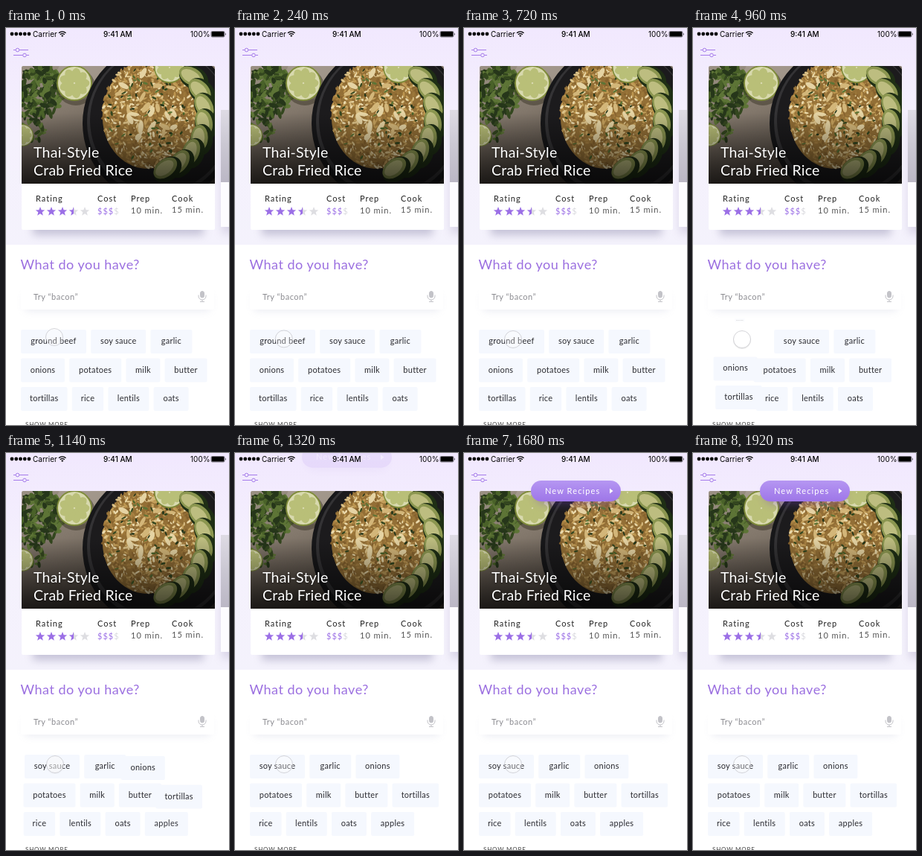
An HTML page for the animation above (2.42 s loop, 300x533 px).

```html
<!DOCTYPE html>
<html lang="en">
<head>
<meta charset="utf-8">
<title>Recipe ingredients</title>
<style>
html, body { margin: 0; width: 100%; height: 100%; overflow: hidden; background: #fff; }
svg { display: block; width: 100vw; height: 100vh; }
text { font-family: Lato, "Open Sans", sans-serif; font-size: 11px; fill: #222; }
.status text { font-family: Inter, "Liberation Sans", sans-serif; font-size: 10px; fill: #000; }
.title text { font-size: 19.5px; letter-spacing: .25px; fill: #fff; text-shadow: 0 1px 3px #0009; }
.info text { letter-spacing: 1px; }
.info .value { fill: #555; }
.chip text { letter-spacing: .25px; text-anchor: middle; fill: #2b2b30; }
</style>
</head>
<body>
<svg viewBox="0 0 300 533" preserveAspectRatio="none">
  <defs>
    <linearGradient id="sky" x2="0" y2="1"><stop stop-color="#f1e8fe"/><stop offset=".5" stop-color="#f5f1fd"/><stop offset="1" stop-color="#f4f2fc"/></linearGradient>
    <linearGradient id="table" x2=".5" y2="1"><stop stop-color="#9b9184"/><stop offset=".4" stop-color="#82776b"/><stop offset="1" stop-color="#3a332e"/></linearGradient>
    <linearGradient id="shade" x2="0" y2="1"><stop offset=".4" stop-color="#000" stop-opacity="0"/><stop offset="1" stop-color="#000" stop-opacity=".66"/></linearGradient>
    <linearGradient id="next" x2="0" y2="1"><stop stop-color="#dedbe4"/><stop offset=".5" stop-color="#cac7d2"/><stop offset="1" stop-color="#bbb7c5"/></linearGradient>
    <linearGradient id="violet" x2="0" y2="1"><stop stop-color="#b596f2"/><stop offset="1" stop-color="#9e76e8"/></linearGradient>
    <linearGradient id="half"><stop offset=".5" stop-color="#9b6fe6"/><stop offset=".5" stop-color="#dedee2"/></linearGradient>
    <filter id="blur" x="-50%" y="-100%" width="200%" height="300%"><feGaussianBlur stdDeviation="6"/></filter>
    <clipPath id="frame"><path d="M21 209V53a2 2 0 0 1 2-2H279a2 2 0 0 1 2 2V209Z"/></clipPath>
  </defs>

  <rect width="300" height="533" fill="#fff"/>
  <rect width="300" height="291" fill="url(#sky)"/>
  <g fill="none" stroke="#a57bea" stroke-width="1">
    <path d="M10 29.500h3M18 29.500h12M10 36.500h12.500M27.500 36.500h3.500"/>
    <circle cx="15.500" cy="29.500" r="2.300"/><circle cx="25" cy="36.500" r="2.300"/>
  </g>

  <rect x="290" y="122" width="20" height="154" fill="#8b80aa" opacity=".25" filter="url(#blur)"/>
  <rect x="289" y="110" width="11" height="157" fill="#fdfcff"/>
  <rect x="289" y="110" width="11" height="97" fill="url(#next)"/>
  <rect x="36" y="200" width="230" height="78" fill="#77739a" opacity=".38" filter="url(#blur)"/>
  <rect x="21" y="51" width="260" height="220" rx="2" fill="#fff"/>
  <g clip-path="url(#frame)">
    <rect x="21" y="51" width="260" height="158" fill="url(#table)"/>
    <g id="food"></g>
    <rect x="21" y="51" width="260" height="158" fill="url(#shade)"/>
  </g>
  <g class="title"><text x="37" y="174">Thai-Style</text><text x="37" y="198">Crab Fried Rice</text></g>

  <g class="info">
    <text x="40" y="233">Rating</text><text x="123" y="233">Cost</text>
    <text x="168" y="233">Prep</text><text x="223" y="233">Cook</text>
    <g id="stars"></g>
    <text x="123" y="249.500" style="fill:#9b6fe6">$$$<tspan fill="#d9d9de">$</tspan></text>
    <text class="value" x="168" y="249">10 min.</text><text class="value" x="223" y="248">15 min.</text>
  </g>

  <text x="19.500" y="323.500" style="font-size:18px;letter-spacing:.5px;fill:#9b6fe0">What do you have?</text>
  <rect x="26" y="358" width="248" height="21" fill="#8f96bb" opacity=".2" filter="url(#blur)"/>
  <rect x="20" y="342" width="260" height="36" rx="2" fill="#fff"/>
  <text x="37" y="365" style="letter-spacing:.5px;fill:#8b8b90">Try “bacon”</text>
  <g stroke="#c3c3c8" fill="none"><rect x="261.500" y="353.500" width="5" height="8.500" rx="2.500" fill="#c3c3c8"/><path d="M259 358.500v1.500a5 5 0 0 0 10 0v-1.500M264 365v3M261 367.500h6"/></g>

  <g id="chips"></g>
  <text x="26" y="535" style="font-size:8px;letter-spacing:.8px;fill:#444">SHOW MORE</text>
  <g id="touch">
    <circle id="glow" cx="66" cy="419" r="12" fill="#777"/>
    <circle id="dot" cx="66" cy="418" r="11.500" fill="#fff" stroke="#c2c2c8" stroke-width=".7"/>
  </g>

  <g id="pill">
    <rect x="96" y="46" width="109" height="22" rx="11" fill="#7448bd" opacity=".4" filter="url(#blur)"/>
    <rect x="90" y="37" width="121" height="28" rx="14" fill="url(#violet)"/>
    <text x="109" y="54.500" style="letter-spacing:1.1px;fill:#fff">New Recipes</text>
    <path d="M196 47.500l4.500 3.500-4.500 3.500z" fill="#fff"/>
  </g>

  <g class="status">
    <path d="M8 8h23.500" stroke="#000" stroke-width="4.800" stroke-linecap="round" stroke-dasharray="0 5.750"/>
    <text x="36" y="11.500">Carrier</text>
    <g fill="none" stroke="#000" stroke-width="1.300"><path d="M71 6.800a6.800 6.800 0 0 1 9.500 0M72.800 8.800a4.200 4.200 0 0 1 6 0"/></g>
    <path d="M74.200 10.300a2.300 2.300 0 0 1 3.200 0l-1.600 1.700z"/>
    <text x="131" y="11.500" font-weight="500">9:41 AM</text><text x="248" y="11.500">100%</text>
    <rect x="276" y="4.500" width="18" height="7.500" rx="1.500" fill="none" stroke="#000" stroke-width=".5"/>
    <rect x="276.600" y="5.100" width="16.800" height="6.300" rx="1"/><path d="M295 6.700q1.500 1.500 0 3z"/>
  </g>
</svg>
<script>
const $ = id => document.getElementById(id);
const clamp = v => Math.max(0, Math.min(1, v));
const span = (t, start, length) => clamp((t - start) / length);
const easeInOut = (u, n) => u < .5 ? (2 * u) ** n / 2 : 1 - (2 - 2 * u) ** n / 2;
const mix = (a, b, p) => a + (b - a) * p;

let seed = 7;
const rand = (a = 0, b = 1) => {
  seed = (seed * 16807) % 2147483647;
  return mix(a, b, seed / 2147483647);
};
const pick = list => list[Math.floor(rand(0, list.length))];
const oval = (x, y, rx, ry, fill, turn = 0, extra = '') =>
  `<ellipse rx="${rx}" ry="${ry}" fill="${fill}" transform="translate(${x} ${y}) rotate(${turn})" ${extra}/>`;

// Scatter small ovals over an elliptical patch.
function scatter(count, x, y, rx, ry, size, colors) {
  let out = '';
  for (let i = 0; i < count; i++) {
    const a = rand(0, 2 * Math.PI), r = Math.sqrt(rand());
    out += oval(x + rx * r * Math.cos(a), y + ry * r * Math.sin(a),
      size * rand(.7, 1.3), size * rand(.3, .55), pick(colors), rand(0, 180));
  }
  return out;
}

function lime(x, y, r) {
  let out = oval(x, y, r, r, '#7f8c3a') + oval(x, y, r * .92, r * .92, '#d8d9ae');
  for (let i = 0; i < 9; i++) {
    const a = i * 40, rad = a * Math.PI / 180;
    out += oval(x + r * .45 * Math.cos(rad), y + r * .45 * Math.sin(rad), r * .4, r * .27, '#b9bf78', a);
  }
  return out;
}

function drawFood() {
  const greens = ['#34471f', '#4a6229', '#26361a', '#5d7436'];
  const grains = ['#c4a05c', '#a98243', '#dcc288', '#86622e', '#ead9ab', '#9c773a', '#bd9650'];
  let out = oval(112, 60, 46, 34, '#b5ab9f', -20, 'opacity=".45"');
  out += scatter(170, 48, 84, 30, 34, 6, greens) + scatter(60, 34, 126, 18, 32, 4.5, greens);
  out += oval(94, 79, 26, 25, '#3b3427', 0, 'opacity=".5"') + lime(92, 74, 24) + lime(22, 144, 15);
  out += oval(206, 128, 103, 106, '#171719') + oval(206, 126, 97, 100, '#343335') + oval(207, 124, 94, 96, '#1c1b1d');
  out += oval(193, 115, 63, 74, '#936f36', 8);
  out += scatter(950, 193, 114, 63, 73, 3, grains);
  out += scatter(24, 190, 108, 44, 54, 7, ['#e5d3a3', '#d3b679']);
  out += scatter(70, 190, 115, 55, 66, 2.8, greens);
  out += lime(220, 53, 21);
  for (let i = 0; i < 8; i++) {
    const a = (-42 + i * 17) * Math.PI / 180;
    const x = 200 + 68 * Math.cos(a), y = 116 + 75 * Math.sin(a), turn = 30 + i * 16;
    out += oval(x + 2, y + 1, 21, 15, '#1f2f15', turn) + oval(x - 1, y - 1, 18, 11.5, '#8b9650', turn)
      + oval(x - 2, y - 1, 14, 8, '#bdbd80', turn);
  }
  $('food').innerHTML = out;
}

function drawStars() {
  const fills = ['#9b6fe6', '#9b6fe6', '#9b6fe6', 'url(#half)', '#dedee2'];
  $('stars').innerHTML = fills.map((fill, i) => {
    const points = Array.from({ length: 10 }, (_, k) => {
      const a = (k * 36 - 90) * Math.PI / 180, r = k % 2 ? 2.8 : 6.5;
      return [46 + i * 15 + r * Math.cos(a), 246.5 + r * Math.sin(a)];
    });
    return `<polygon points="${points.join(' ')}" fill="${fill}"/>`;
  }).join('');
}

const items = [['ground beef', 88], ['soy sauce', 74], ['garlic', 56], ['onions', 59], ['potatoes', 70],
  ['milk', 46], ['butter', 57], ['tortillas', 62.5], ['rice', 42.5], ['lentils', 55], ['oats', 47], ['apples', 58]];

// Place chips in rows of three, four and the rest.
function flow(list) {
  let x = 20;
  return list.map(([, width], i) => {
    if (i === 3 || i === 7) x = 20;
    const place = { x, y: 405 + 38.5 * ((i >= 3) + (i >= 7)) };
    x += width + 6.2;
    return place;
  });
}
const before = flow(items), after = flow(items.slice(1));

drawFood();
drawStars();
$('chips').innerHTML = items.map(([name, width]) =>
  `<g class="chip"><rect width="${width}" height="32" rx="2" fill="#f5f8fe"/><text x="${width / 2}" y="19">${name}</text></g>`).join('');
const chips = [...$('chips').children];

function draw(t) {
  const gone = easeInOut(span(t, 740, 230), 2);
  chips[0].setAttribute('transform', `translate(${mix(64, 63, gone)} ${mix(421, 392, gone)}) scale(${mix(1, .15, gone)}) translate(-44 -16)`);
  chips[0].setAttribute('opacity', t > 1000 ? 0 : 1 - gone * .7);

  const shift = easeInOut(span(t, 840, 420), 4);
  after.forEach((to, i) => {
    const from = before[i + 1];
    chips[i + 1].setAttribute('transform', `translate(${mix(from.x, to.x, shift)} ${mix(from.y, to.y, shift)})`);
  });
  chips[11].setAttribute('opacity', shift < .1 ? 0 : shift);

  const settle = span(t, 0, 300), press = span(t, 720, 180) * (1 - span(t, 1020, 180));
  $('touch').setAttribute('transform', `translate(${settle - 1} ${3 * settle - 3})`);
  $('dot').setAttribute('fill-opacity', mix(.3, 1, press));
  $('glow').setAttribute('opacity', press * .15);

  const drop = easeInOut(span(t, 1200, 420), 3);
  $('pill').setAttribute('transform', `translate(0 ${mix(-50, 0, drop)})`);
  $('pill').setAttribute('opacity', clamp(drop * 1.4));
}

function tick() {
  const t = performance.now() % 2420;
  draw(Math.min(1920, Math.floor(t / 60) * 60));
  requestAnimationFrame(tick);
}
tick();
</script>
</body>
</html>
```
